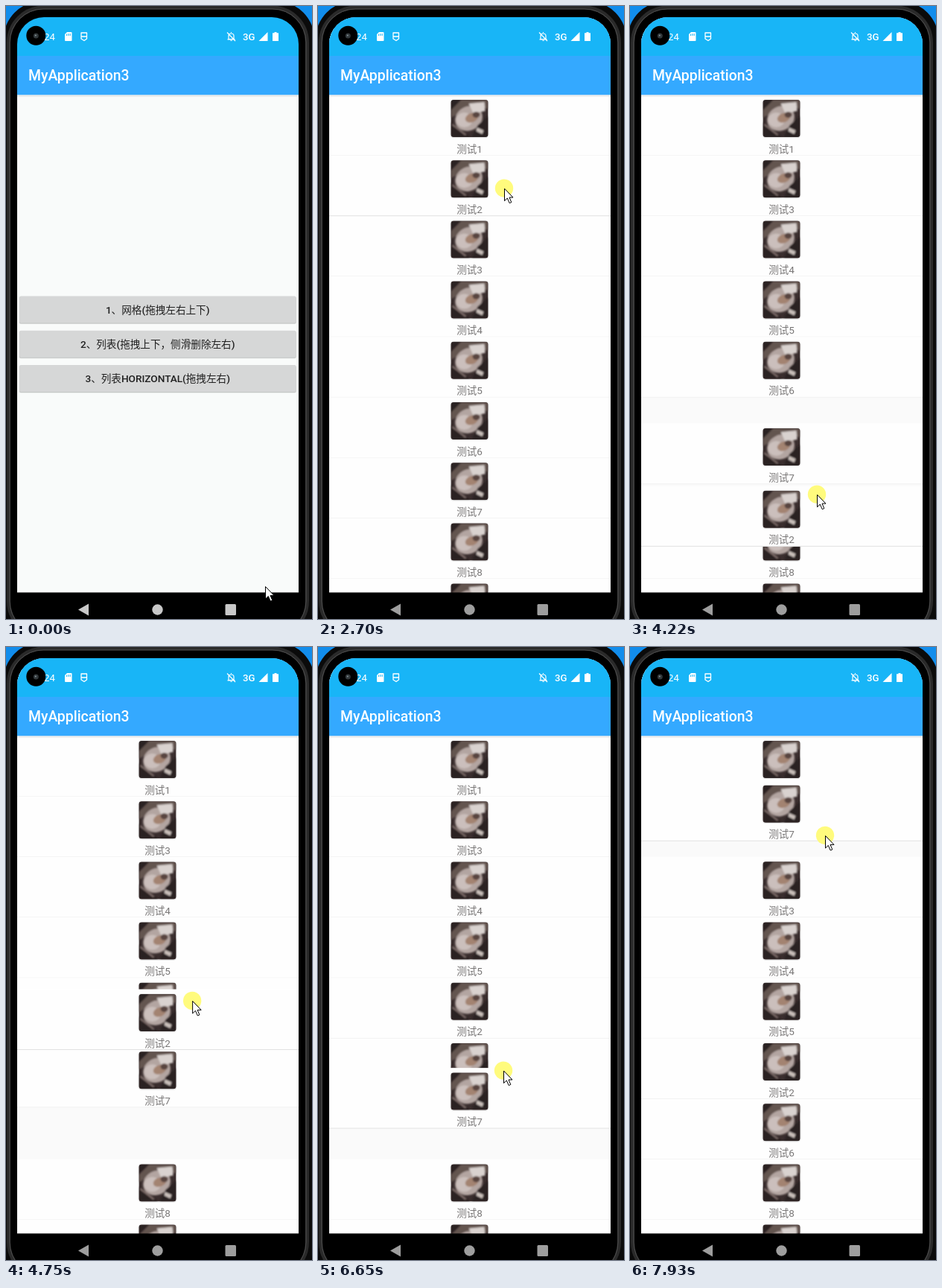
An HTML page that plays this animation: 411 px wide and 823 px high, repeating every 7990 ms.

```html
<!DOCTYPE html>
<html lang="zh-CN">
<head>
<meta charset="utf-8">
<title>Drag to reorder</title>
<style>
html, body { margin: 0; width: 100%; height: 100%; overflow: hidden; background: #050505; }
svg { display: block; width: 100vw; height: 100vh; }
text { font-family: Roboto, "Noto Sans CJK SC", "Noto Sans CJK", sans-serif; }
.title { font-size: 19.4px; font-weight: 500; fill: #fff; }
.status { font-size: 13.2px; fill: #fff; }
.button { font-size: 13.6px; fill: #202020; text-anchor: middle; }
.latin { font-weight: 500; }
.label { font-size: 13.5px; fill: #797777; text-anchor: middle; }
</style>
</head>
<body>
<svg viewBox="0 0 411 823">
  <defs>
    <clipPath id="glass"><rect x="15" y="15" width="378" height="850" rx="36"/></clipPath>
    <clipPath id="window"><rect x="15" y="15" width="378" height="773"/></clipPath>
    <clipPath id="key"><rect x="18" y="435.5" width="371.5" height="36" rx="2"/></clipPath>
    <clipPath id="round"><rect width="50" height="50" rx="4"/></clipPath>
    <filter id="soft"><feGaussianBlur stdDeviation=".9"/></filter>
    <g id="bar">
      <rect x="15" y="15" width="378" height="53" fill="#18b5f7"/>
      <rect x="15" y="119" width="378" height="3" fill="#000" opacity=".06"/>
      <rect x="15" y="67" width="378" height="52.3" fill="#34a9ff"/>
      <text class="title" x="30" y="100">MyApplication3</text>
    </g>
    <g id="photo" clip-path="url(#round)">
      <rect width="50" height="50" fill="#3a2e2e"/>
      <g filter="url(#soft)">
        <path d="M0 0H50V12L30 8L0 24Z" fill="#64544f"/>
        <ellipse cx="24" cy="25" rx="19" ry="16" transform="rotate(-28 24 25)" fill="#b3a5a1"/>
        <ellipse cx="18" cy="27" rx="11" ry="10" fill="#cbbfbc"/>
        <path d="M24 5L45 3L46 15L30 18Z" fill="#d9d2cf"/>
        <ellipse cx="28" cy="24" rx="9" ry="6" transform="rotate(-20 28 24)" fill="#a38371"/>
        <ellipse cx="34" cy="20" rx="5" ry="4" fill="#584440"/>
        <path d="M0 30L26 50H0ZM50 22L36 34L28 50H50ZM0 0H14L0 14Z" fill="#2a2224"/>
        <path d="M2 33L20 47" stroke="#85736f" stroke-width="2"/>
        <path d="M35 37L44 41L42 46L34 42Z" fill="#c9bfba"/>
      </g>
    </g>
  </defs>

  <rect width="411" height="40" fill="#128dec"/>
  <rect x="-3" y="-6" width="417" height="856" rx="50" fill="#0b0b0b"/>
  <rect x="3.5" y="2" width="401" height="844" rx="47" fill="#000" stroke="#2a2a2a" stroke-width="5"/>
  <rect x="5" y="4" width="398" height="840" rx="45" fill="none" stroke="#4e4e4e"/>

  <g clip-path="url(#glass)">
    <g id="menu">
      <rect x="15" y="67" width="378" height="721" fill="#f9fbfa"/>
      <g id="buttons"></g>
      <g clip-path="url(#key)"><circle id="ripple" cx="244" cy="452" fill="#000"/></g>
      <g id="captions"></g>
      <use href="#bar"/>
    </g>
    <g id="list" clip-path="url(#window)">
      <rect x="15" y="67" width="378" height="721" fill="#fafafa"/>
      <g id="rows"></g>
      <use href="#bar"/>
    </g>
    <rect x="15" y="787.4" width="378" height="40" fill="#000"/>
    <g id="nav">
      <path d="M97 810.5L111 802.5V818.5Z"/>
      <circle cx="203.5" cy="810.5" r="7.2"/>
      <rect x="294.5" y="803" width="14.5" height="15" rx="1.5"/>
    </g>
    <g fill="#fff">
      <text class="status" x="51" y="46">24</text>
      <path d="M82 35H87.5Q88.5 35 88.5 36V46Q88.5 47 87.5 47H80Q79 47 79 46V38Z"/>
      <path d="M81.6 37.5V40M83.9 37V40M86.2 37V40" stroke="#18b5f7"/>
      <path d="M101 36H108.5V44L105 46.5L101 44ZM101 41H108.5" fill="none" stroke="#fff" stroke-width="1.3" stroke-linejoin="round"/>
      <path d="M299 44.5V40Q299 37 302.5 37T306 40V44.5ZM297.5 44.8H307.5M297 35.5L308 47M302.5 36V35M301.5 46.5H303.5" fill="none" stroke="#fff" stroke-width="1.2"/>
      <text class="status latin" x="318" y="46">3G</text>
      <path d="M351.5 35V47H339.5Z"/>
      <path d="M360.5 35H363.5V36.2H366V47H358V36.2H360.5Z"/>
    </g>
  </g>
  <circle cx="40.3" cy="39.8" r="13" fill="#000"/>
  <circle cx="40.3" cy="40" r="3.5" fill="#33393c"/>
  <circle cx="39.8" cy="39.6" r="1" fill="#8b979d"/>

  <g id="pointer">
    <circle id="press" r="12.2" fill="#fffb7d"/>
    <path d="M.5 .5V17L4.3 13.4L7.2 20L9.8 18.9L7 12.4H12Z" fill="#fff" stroke="#000"/>
  </g>
</svg>

<script>
const LOOP = 7990, TOP = 119.5, STEP = 81.2;
const SLIDE = 250, LAG = 70, REACT = 130;
const $ = id => document.getElementById(id);
const clamp = v => Math.min(1, Math.max(0, v));
const ease = v => (1 - Math.cos(Math.PI * clamp(v))) / 2;
const mix = (a, b, v) => a + (b - a) * v;

// Turning points of the pointer: [time, x, y]
const path = [
  [20, 348, 779], [390, 244, 451], [680, 244, 451], [1580, 264, 319],
  [2030, 250, 240], [2690, 250, 240], [3340, 250, 514], [4050, 251, 686],
  [4150, 251, 684], [4220, 251, 656], [4830, 250, 448], [5130, 250, 450],
  [5600, 238, 646], [6500, 238, 646], [6650, 249, 569], [7260, 256, 317],
  [7500, 260, 236], [7860, 261, 218], [7930, 262, 253]
];

function pointer(t) {
  const i = path.findIndex(p => p[0] > t);
  if (i <= 0) return path.at(i).slice(1);
  const [a, b] = [path[i - 1], path[i]], v = (t - a[0]) / (b[0] - a[0]);
  return [mix(a[1], b[1], v), mix(a[2], b[2], v)];
}

// Each drag: row, press, lift and release times
const drags = [
  { row: 2, press: 2250, lift: 2380, release: 4960 },
  { row: 7, press: 5910, lift: 6050, release: LOOP }
];
const order = [1, 2, 3, 4, 5, 6, 7, 8, 9];
const slides = [];

// The held row trails the pointer
const pull = (d, t) => pointer(t - LAG)[1] - pointer(d.lift)[1];

// A neighbour gives way once the held row has passed its edge
for (const d of drags) {
  let slot = order.indexOf(d.row);
  d.moved = 0;
  for (let t = d.lift + LAG; t < d.release; t += 5) {
    const ahead = pull(d, t) / STEP - d.moved;
    if (Math.abs(ahead) <= 1) continue;
    const dir = Math.sign(ahead);
    const row = order[slot + dir];
    slides.push({ row, start: t + REACT, dir: -dir });
    order[slot] = row;
    order[slot += dir] = d.row;
    d.moved += dir;
  }
}

function dragged(d, t) {
  if (t < d.lift + LAG) return 0;
  if (t < d.release) return pull(d, t);
  return mix(pull(d, d.release), d.moved * STEP, ease((t - d.release) / 210));
}

function rowTop(n, t) {
  let y = TOP + STEP * (n - 1);
  for (const s of slides)
    if (s.row === n) y += s.dir * STEP * ease((t - s.start) / SLIDE);
  for (const d of drags)
    if (d.row === n) y += dragged(d, t);
  return y;
}

["1、网格(拖拽左右上下)", "2、列表(拖拽上下，侧滑删除左右)", "3、列表HORIZONTAL(拖拽左右)"].forEach((s, i) => {
  const y = 389.5 + i * 46.2;
  const caption = s.replace(/[\w()]+/g, '<tspan class="latin">$&</tspan>');
  $("buttons").innerHTML +=
    `<rect x="17.5" y="${y + .5}" width="372.5" height="37" rx="2.5" fill="#000" opacity=".1"/>
     <rect x="18" y="${y + 1}" width="371.5" height="36" rx="2" fill="#000" opacity=".12"/>
     <rect x="18" y="${y}" width="371.5" height="36" rx="2" fill="#d6d7d7"/>`;
  $("captions").innerHTML += `<text class="button" x="203.7" y="${y + 23}">${caption}</text>`;
});

const rows = [];
for (let n = 1; n <= 9; n++) {
  const g = document.createElementNS("http://www.w3.org/2000/svg", "g");
  g.innerHTML =
    `<rect x="15" width="378" height="${STEP}" fill="#fefefe"/>
     <rect class="edge" x="15" y="${STEP - .7}" width="378" height="1"/>
     <rect x="177.5" y="5.8" width="52" height="52" rx="4.5" fill="#000" opacity=".1"/>
     <use href="#photo" x="178.5" y="6.5"/>
     <text class="label" x="203.5" y="77">测试${n}</text>`;
  $("rows").append(g);
  rows.push({ n, g, edge: g.querySelector(".edge") });
}

const zoom = s => `translate(204 453) scale(${s}) translate(-204 -453)`;

function draw(t) {
  // menu button ripple
  $("ripple").setAttribute("r", 240 * ease((t - 500) / 420));
  $("ripple").setAttribute("opacity", t < 530 ? 0 : .13 * (1 - clamp((t - 900) / 420)));
  const grey = Math.round(mix(200, 158, clamp((t - 1100) / 220)));
  $("nav").setAttribute("fill", `rgb(${grey},${grey},${grey})`);

  // screen change
  const open = 1 - Math.pow(1 - clamp((t - 1385) / 400), 5);
  $("menu").setAttribute("transform", zoom(1 + .15 * open));
  $("list").setAttribute("transform", zoom(.85 + .15 * open));
  $("list").setAttribute("opacity", clamp((t - 1395) / 60));

  // rows
  const held = drags.findLast(d => t >= d.press) || drags[0];
  const top = rows[held.row - 1].g;
  if ($("rows").lastChild !== top) $("rows").append(top);
  for (const { n, g, edge } of rows) {
    g.setAttribute("transform", `translate(0 ${rowTop(n, t).toFixed(2)})`);
    const lifted = n === held.row && t >= held.lift && t < held.release + SLIDE;
    edge.setAttribute("fill", lifted ? "#e2e2e2" : "#f2f2f2");
  }

  // pointer
  const [x, y] = pointer(t);
  $("pointer").setAttribute("transform", `translate(${x.toFixed(2)} ${y.toFixed(2)})`);
  const down = (t >= 530 && t < 660) || drags.some(d => t >= d.press && t < d.release);
  $("press").setAttribute("visibility", down ? "visible" : "hidden");
}

const begin = performance.now();
function tick() {
  draw((performance.now() - begin) % LOOP);
  requestAnimationFrame(tick);
}
tick();
</script>
</body>
</html>
```
